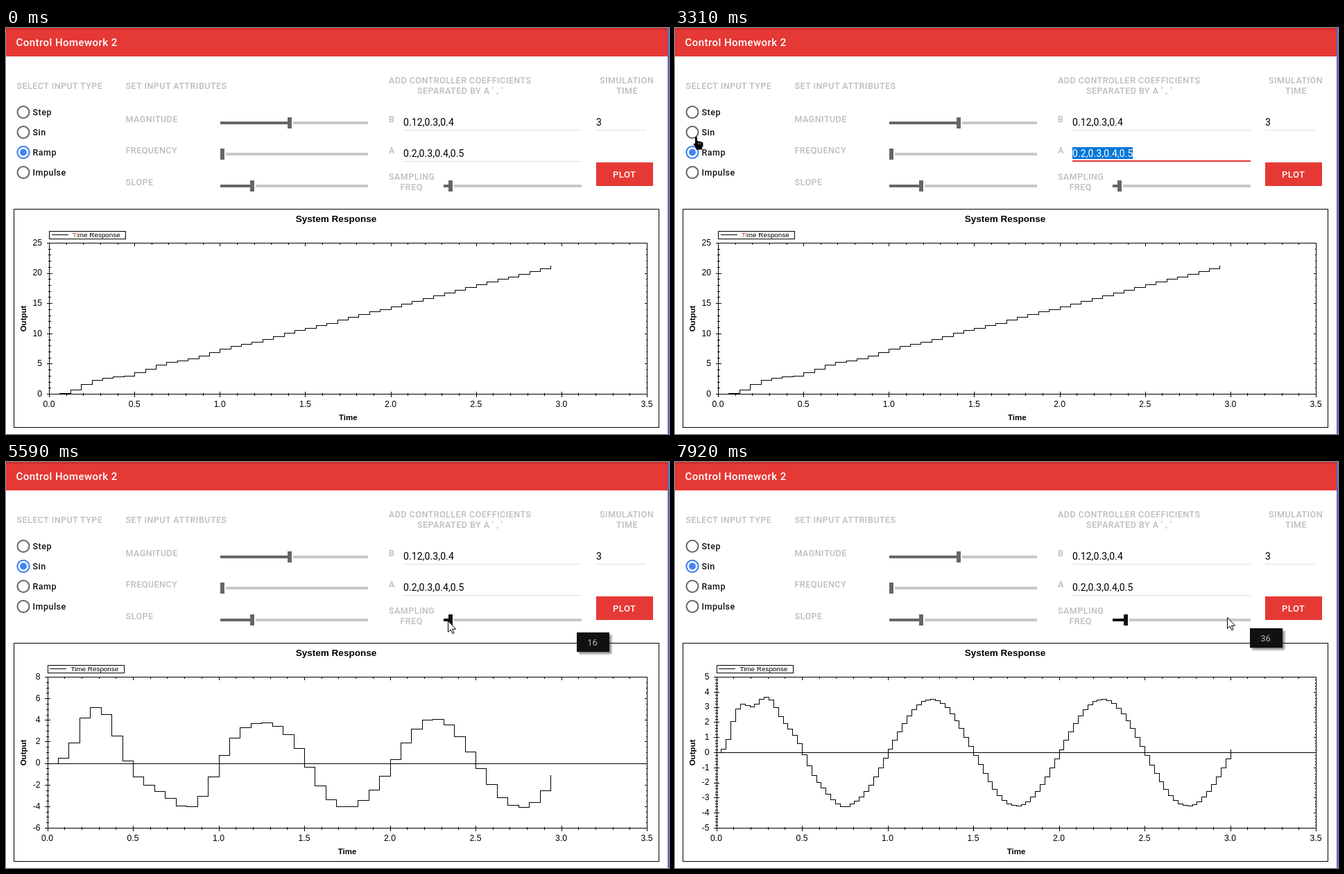
Write an HTML page that moves like this. It is 956 by 586 pixels and loops after 8000 ms.

```html
<!DOCTYPE html>
<html lang="en">
<head>
<meta charset="utf-8">
<title>Control Homework 2</title>
<style>
html, body { margin: 0; width: 100%; height: 100%; overflow: hidden; background: #fff; }
svg { display: block; width: 100vw; height: 100vh; }
text { white-space: pre; }
.label { font: 500 12.5px Roboto, sans-serif; letter-spacing: .48px; fill: #bdbdbd; }
.option { font: 500 12.5px Roboto, sans-serif; letter-spacing: .5px; fill: #111; }
.field { font: 400 14px Roboto, sans-serif; letter-spacing: .1px; fill: #000; }
.head { font: 500 15px Roboto, sans-serif; letter-spacing: .45px; fill: #fff; }
.button { font: 500 13px Roboto, sans-serif; letter-spacing: .5px; fill: #fff; }
.tip { font: 400 13px Roboto, sans-serif; fill: #b4b4b4; text-anchor: middle; }
.chart text { font: 12.2px "Liberation Sans", Arial, sans-serif; text-anchor: middle; }
.chart .title { font-weight: bold; font-size: 13.5px; }
.chart .axis { font-weight: bold; font-size: 11.5px; }
.chart .legend { font-size: 9.9px; text-anchor: start; }
.chart .value { text-anchor: end; }
.chart path { fill: none; stroke: #000; shape-rendering: crispEdges; }
rect { shape-rendering: crispEdges; }
#tooltip rect { filter: drop-shadow(3px 3px 1.5px rgba(0, 0, 0, .45)); }
.selected { fill: #fff; }
.ghost { fill: #fff; stroke: #3d97e0; stroke-width: .8px; }
</style>
</head>
<body>
<svg viewBox="0 0 956 586" id="stage"></svg>
<script>
const LOOP = 8000, RED = '#e53935', GREY = '#666';
const text = (cls, x, y, s) => `<text class="${cls}" x="${x}" y="${y}">${s}</text>`;
const rect = (x, y, w, h, fill, extra = '') =>
  `<rect x="${x}" y="${y}" width="${w}" height="${h}" fill="${fill}" ${extra}/>`;
const group = (id, body, cls = '') => `<g id="${id}" class="${cls}">${body}</g>`;

// Output of the discrete filter sum(A)*y = sum(B)*u for the given input.
function respond(input, count) {
  const b = [0.12, 0.3, 0.4], a = [0.2, 0.3, 0.4, 0.5], y = [];
  for (let k = 0; k < count; k++) {
    y[k] = b.reduce((s, c, i) => k < i ? s : s + c * input(k - i), 0)
         - a.reduce((s, c, i) => k <= i ? s : s + c * y[k - 1 - i], 0);
  }
  return y;
}

function chart(id, left, min, max, major, minor, rate, samples) {
  const right = 924.5, top = 310.5, bottom = 528.5;
  const px = t => left + t / 3.5 * (right - left);
  const py = v => bottom - (v - min) / (max - min) * (bottom - top);
  let ticks = '', labels = '';
  for (let i = 0; i <= 35; i++) {
    const x = px(i / 10), n = i % 5 ? 2 : 4;
    ticks += `M${x} ${bottom - n}v${2 * n}M${x} ${top}v${n}`;
    if (n == 4) labels += text('', x - .5, 547, (i / 10).toFixed(1));
  }
  const per = Math.round(major / minor), total = Math.round((max - min) / minor);
  for (let i = 0; i <= total; i++) {
    const v = min + i * minor, y = py(v), n = i % per ? 2 : 4;
    ticks += `M${left - n} ${y}h${2 * n}M${right} ${y}h${-n}`;
    if (n == 4) labels += text('value', left - 10.5, y + 3.3, Math.round(v));
  }
  let trace = `M${px(0)} ${py(0)}`;
  samples.forEach((v, k) => trace += `H${px(k / rate)}V${py(v)}`);
  const legend = min ? 'Time Response' : '<tspan fill="#d8403a">Ti</tspan>me Response';
  return group(id,
    `<path d="M${left} ${top}H${right}V${bottom}H${left}ZM${left} ${py(0)}H${right}${ticks}"/>
     <path d="${trace}"/>
     <path d="M${left} 293.5h110v11h-110zM${left + 3} 298.5h24"/>` + labels +
    text('legend', left + 33.5, 301.5, legend) +
    text('title', 476, 280, 'System Response') +
    text('axis', left / 2 + 462, 566, 'Time') +
    '<text class="axis" transform="translate(29 419.5) rotate(-90)">Output</text>', 'chart');
}

const slider = (x0, x1, y, thumb, color = GREY) =>
  rect(thumb + 5, y - 2, x1 - thumb - 5, 4, '#c8c8c8') + knob(x0, y, thumb, color);
const knob = (x0, y, thumb, color) =>
  rect(x0, y - 2, thumb - x0, 4, color) + rect(thumb - 3, y - 8, 6, 16, color);
const radio = (name, i) =>
  `<circle cx="25" cy="${121.5 + 29 * i}" r="8.5" fill="none" stroke="${GREY}" stroke-width="2"/>` +
  text('option', 38.5, 126 + 29 * i, name);
const underline = (x, y, w) => rect(x, y, w, 1, '#e0e0e0');
const sine = rate => k => 10 * Math.sin(2 * Math.PI * k / rate);

document.getElementById('stage').innerHTML =
  rect(0, 0, 954, 41, RED) + rect(0, 0, 954, 3, '#d32f2f') + rect(954, 0, 2, 586, '#6464d2') +
  text('head', 14.5, 26, 'Control Homework 2') +
  text('label', 15.5, 88, 'SELECT INPUT TYPE') +
  text('label', 172.5, 88, 'SET INPUT ATTRIBUTES') +
  text('label', 552, 80, 'ADD CONTROLLER COEFFICIENTS') +
  text('label', 593, 95, "SEPARATED BY A ' , '") +
  text('label', 856, 80, 'SIMULATION') + text('label', 880, 95, 'TIME') +
  ['Step', 'Sin', 'Ramp', 'Impulse'].map(radio).join('') +
  group('choice', `<circle cx="25" cy="121.5" r="8.5" fill="#fff" stroke="#4285f4" stroke-width="2"/>
    <circle cx="25" cy="121.5" r="5" fill="#4285f4"/>`) +
  text('label', 172.5, 135.5, 'MAGNITUDE') + slider(309, 522, 137, 409) +
  text('label', 172.5, 181, 'FREQUENCY') + slider(309, 522, 182, 312) +
  text('label', 172.5, 227, 'SLOPE') + slider(309, 522, 228, 355) +
  text('label', 552, 135.5, 'B') + text('label', 552, 181, 'A') +
  text('label', 552, 219, 'SAMPLING') + text('label', 568.5, 234, 'FREQ') +
  underline(573, 147, 257) + underline(573, 192, 257) + underline(851, 147, 72) +
  rect(573, 146, 257, 2, RED, 'id="focusB"') + rect(573, 191, 257, 2, RED, 'id="focusA"') +
  rect(573, 127, 73, 17, '#0078d7', 'id="markB"') + rect(573, 172, 87, 17, '#0078d7', 'id="markA"') +
  '<text id="textB" x="573" y="140.5">0.12,0.3,0.4</text>' +
  '<text id="textA" x="573" y="186">0.2,0.3,0.4,0.5</text>' +
  rect(645, 127, 1, 17, '#ff8728', 'id="caret"') +
  text('field', 851, 140.5, '3') +
  rect(851, 194, 81.5, 34, RED) + text('button', 875, 215.5, 'PLOT') +
  group('low', slider(631, 830, 228, 641)) + group('high', slider(631, 830, 228, 650)) +
  group('lowActive', knob(631, 228, 641, '#111')) + group('highActive', knob(631, 228, 650, '#111')) +
  '<path d="M11.5 261.5h930v315h-930z" fill="none" stroke="#000" shape-rendering="crispEdges"/>' +
  chart('ramp', 62.5, 0, 25, 5, 1, 16, respond(k => 21 * k / 16, 48)) +
  chart('sineCoarse', 60, -6, 8, 2, .5, 16, respond(sine(16), 48)) +
  chart('sineFine', 60, -5, 5, 1, .2, 36, respond(sine(36), 109)) +
  group('tooltip', rect(0, 0, 47, 28, '#111') + '<text id="tipText" class="tip" x="22.5" y="19"></text>') +
  group('cursor',
    group('arrow', '<path d="M.5 .5V16.5L4.2 13L6.8 18.7L9 17.7L6.5 12.2H11.7Z" fill="#fff" stroke="#000"/>') +
    group('beam', '<path d="M-3.5 -8.5h3M1.5 -8.5h3M.5 -8v17M-3.5 9.5h3M1.5 9.5h3" fill="none" stroke="#000" shape-rendering="crispEdges"/>') +
    group('hand', `<path d="M-2 1Q-.5 -1 1 1V6L8 7.5Q9.5 8 9.5 10V13L8 16V18.5H-.5V16L-4.5 11Q-4 8.5 -2 10Z" fill="#000"/>
      <path d="M2.8 8v3M5.3 8.5v3" stroke="#fff" stroke-width=".6"/>`));

const el = id => document.getElementById(id);
const show = (id, on) => el(id).style.display = on ? '' : 'none';

// Pointer moves: start, end, number of hops, destination.
const moves = [
  [70, 510, 7, 724, 131], [740, 740, 1, 724, 136], [890, 1230, 5, 714, 135],
  [1840, 2390, 8, 676, 184], [2540, 2940, 6, 57, 193], [3090, 3310, 4, 31, 157],
  [3540, 4020, 7, 757, 246], [4100, 4180, 2, 811, 266], [4270, 4410, 3, 910, 213],
  [5280, 5590, 5, 637, 229], [5760, 5900, 3, 650, 228], [6440, 6900, 7, 874, 219],
  [7070, 7070, 1, 876, 219], [7860, 7920, 2, 796, 224]
];
// Tooltips: start, end, position.
const tips = [[3840, 4180, 652, 257], [5350, 6840, 823, 246], [7850, 8300, 829, 240]];

function pointer(t) {
  let x = 836, y = 578;
  for (const [start, end, hops, toX, toY] of moves) {
    if (t < start) break;
    const gap = (end - start) / (hops - 1) || 1;
    const p = Math.min(1, (Math.floor((t - start) / gap + .001) + 1) / hops);
    x += (toX - x) * p;
    y += (toY - y) * p;
  }
  return [Math.round(x), Math.round(y)];
}

function draw(t) {
  const [x, y] = pointer(t);
  const beam = x > 573 && x < 830 && y > 120 && y < 196, hand = x < 45;
  show('cursor', t >= 70);
  el('cursor').setAttribute('transform', `translate(${x} ${y})`);
  show('beam', beam);
  show('hand', hand);
  show('arrow', !beam && !hand);

  const markB = t >= 1150 && t < 1520, ghost = t >= 1520 && t < 1920, markA = t >= 2310 && t < 3460;
  show('focusB', t >= 1000 && t < 2150);
  show('focusA', t >= 2150 && t < 3460);
  show('markB', markB);
  show('markA', markA);
  show('caret', ghost);
  el('textB').setAttribute('class', 'field ' + (markB ? 'selected' : ghost ? 'ghost' : ''));
  el('textA').setAttribute('class', 'field ' + (markA ? 'selected' : ''));
  el('choice').setAttribute('transform', `translate(0 ${t < 3460 ? 58 : 29})`);

  const fast = t >= 6140, tip = tips.find(([start, end]) => t >= start && t < end);
  const glow = tip ? Math.min(1, (t - tip[0]) / 60, (tip[1] - t) / 210) : 0;
  show('low', !fast);
  show('high', fast);
  el('lowActive').style.opacity = fast ? 0 : glow;
  el('highActive').style.opacity = fast ? glow : 0;
  el('tooltip').style.opacity = glow;
  if (tip) el('tooltip').setAttribute('transform', `translate(${tip[2]} ${tip[3]})`);
  el('tipText').textContent = fast ? '36' : '16';

  show('ramp', t < 4810);
  show('sineCoarse', t >= 4810 && t < 7220);
  show('sineFine', t >= 7220);
}

function frame() {
  draw(performance.now() % LOOP);
  requestAnimationFrame(frame);
}
frame();
</script>
</body>
</html>
```
